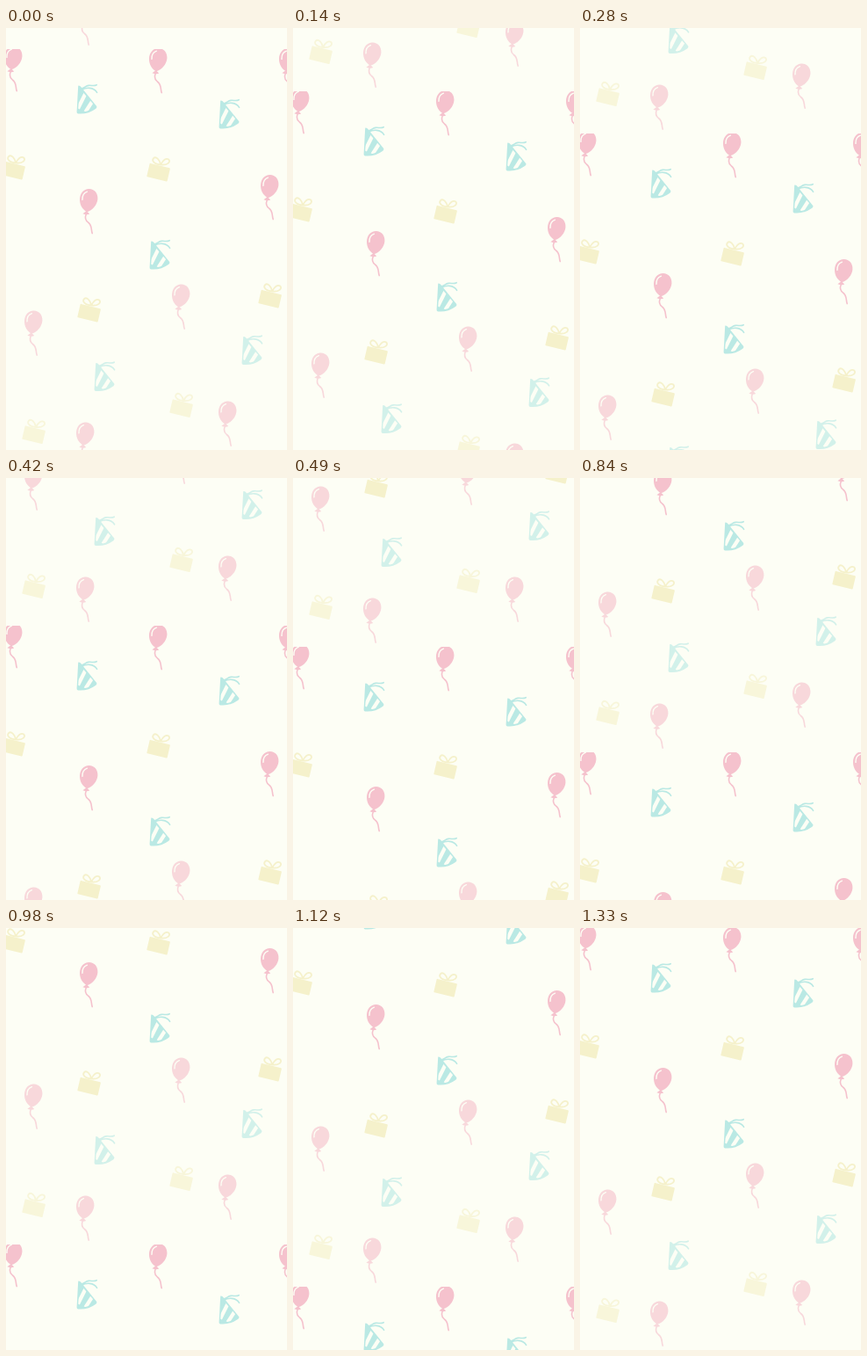
Recreate the animation shown at these times as an HTML page. Size 320 by 480 pixels, loop 1400 ms.

```html
<!DOCTYPE html>
<html lang="en">
<head>
<meta charset="utf-8">
<title>Party pattern</title>
<style>
  :root { --paper: #fdfef5; --pink: #f5c2cd; --mint: #bae9e4; --cream: #f5f1cb; }
  html, body { margin: 0; width: 100%; height: 100%; overflow: hidden; background: var(--paper); }
  #stage { position: relative; width: 320px; height: 480px; overflow: hidden; }
  #strip { position: absolute; left: 0; top: -480px; width: 320px; }
  .tile { display: block; width: 320px; height: 480px; overflow: hidden; }
  .line { fill: none; stroke-linecap: round; stroke-linejoin: round; }
  #balloon { fill: var(--pink); stroke: var(--pink); stroke-width: 0; }
  #hat { fill: var(--mint); stroke: var(--mint); stroke-width: 0; }
  #gift { fill: var(--cream); stroke: var(--cream); stroke-width: 0; }
  #balloon .line, #hat .line { stroke-width: 1.6; }
  #gift .line { stroke-width: 1.8; }
  #balloon .shine { stroke: var(--paper); stroke-width: 1.4; }
  #hat .stripe { stroke: var(--paper); stroke-width: 4.2; }
</style>
</head>
<body>
<div id="stage">
  <svg width="0" height="0" style="position:absolute">
    <defs>
      <clipPath id="cone"><path d="M3.6 5L2 32Q13.5 33 22 26Z"/></clipPath>
      <g id="balloon">
        <path d="M.7 0C6.8.2 10.8 5 10.4 11.4C10 18 4.2 24.6-2 26.2C-7 23.6-10.3 18-10 11.6C-9.7 5-5.4-.2.7 0Z"/>
        <path d="M-2.3 25L1.2 28.6Q-2 30-6.6 28.2Z"/>
        <path class="line" d="M-2.8 29C-4.4 33-3.6 35.6-.6 38C4.4 41.6 2.6 46 4.2 50.6"/>
        <path class="line shine" d="M-7 12.4C-7.2 8-5 4.4-1.6 3.2"/>
      </g>
      <g id="hat">
        <path d="M2.2 2.2Q4.6 1.6 6.2 4.6L23.2 25.6Q24 27 22.4 28.2Q13 35 2 33.9Q.4 33.6.6 32Z"/>
        <path class="stripe" clip-path="url(#cone)" d="M2 28L10.5 11M10.5 32L19.5 18"/>
        <path class="line" d="M5 5.6C9 5 10.6 2.4 14 1.9C17.4 1.4 20 3 23.2 1.2M6 7C11 3.8 20 3.6 23.6 9.8"/>
      </g>
      <g id="gift">
        <path d="M4.6 9.4L26.2 14.8Q27 15 26.8 15.9L23.7 29.3Q23.5 30.2 22.6 30L1 24.8Q.2 24.6.4 23.7L3.6 10Q3.8 9.2 4.6 9.4Z"/>
        <path class="line" d="M16.2 11C8.6 10.4 5.6 6.4 8 3.6C10.8 1 15 5 16.2 11C18.6 5.8 22.4 3 25.2 5C28 7.8 24 11.8 16.2 11"/>
      </g>
    </defs>
  </svg>
  <div id="strip"></div>
</div>
<script>
  // Every cluster repeats the same three objects around its anchor.
  const offsets = { balloon: [0, 0], hat: [69, 57.5], gift: [-13, 121.5] };
  const clusters = [
    [8, -3, 'balloon', 'gift'], [11, -18, 'hat'], [321, -1, 'balloon'],
    [173, -1], [300, 143], [94, 159],
    [199, 267.5], [31, 297.5], [252, 400.5], [90, 424.5]
  ];

  const drawCluster = ([x, y, ...parts]) => {
    const names = parts.length ? parts : Object.keys(offsets);
    const opacity = y > 240 ? 0.63 : 1;
    return names.map(name => {
      const [dx, dy] = offsets[name];
      return `<use href="#${name}" x="${x + dx}" y="${y + dy}" opacity="${opacity}"/>`;
    }).join('');
  };

  const tile = `<svg class="tile" viewBox="0 0 320 480">${clusters.map(drawCluster).join('')}</svg>`;
  const strip = document.getElementById('strip');
  strip.innerHTML = tile.repeat(2);

  // One tile height per loop, in 20 hard steps of 24px.
  strip.animate(
    [{ transform: 'translateY(24px)' }, { transform: 'translateY(504px)' }],
    { duration: 1400, iterations: Infinity, easing: 'steps(20, end)' }
  );
</script>
</body>
</html>
```
